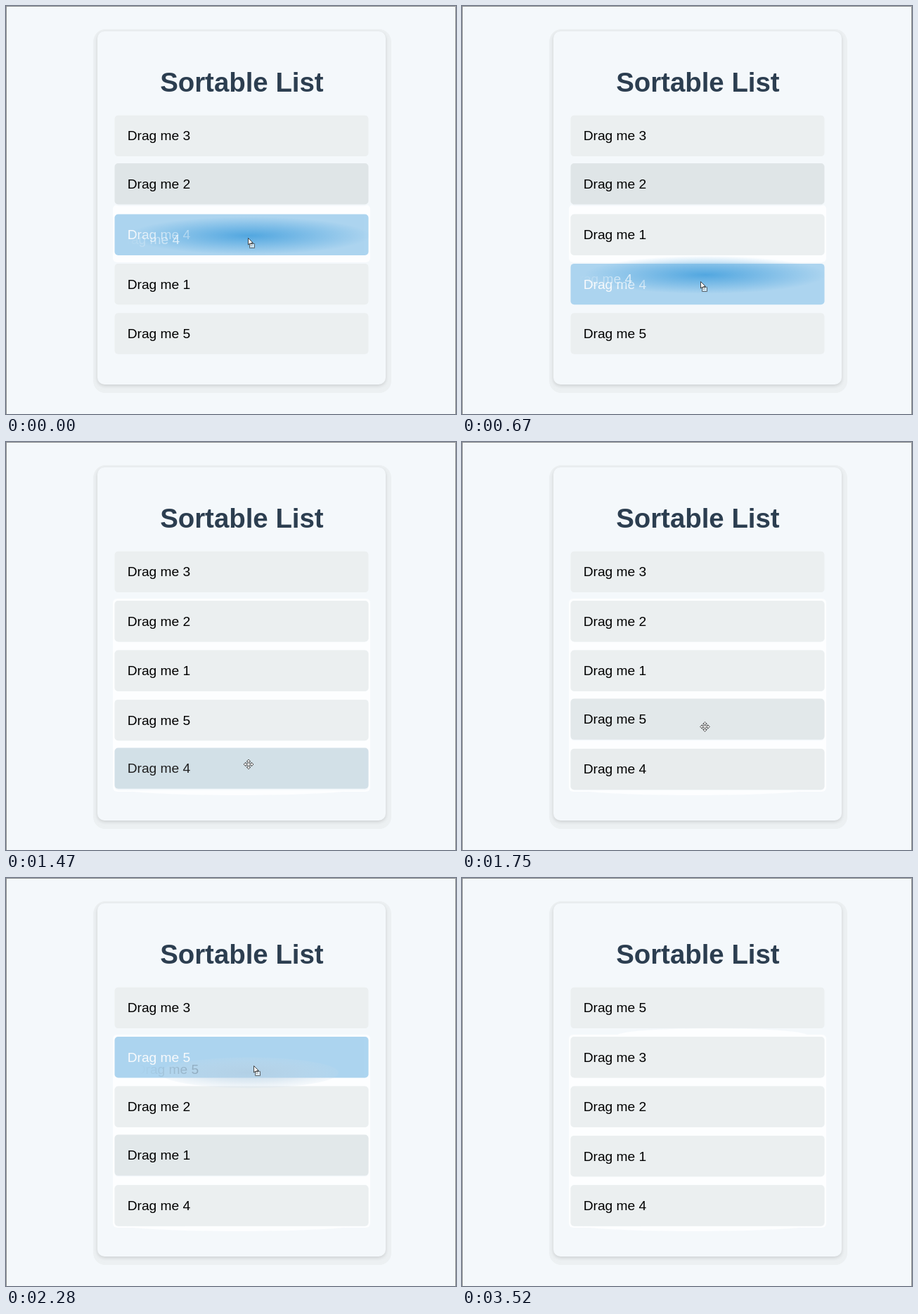
Animation, 640 px wide and 581 px high, one loop 4.13 s. Source, as an HTML page:

```html
<!DOCTYPE html>
<html lang="en">
<head>
<meta charset="utf-8">
<title>Sortable List</title>
<style>
  html, body { margin: 0; width: 100%; height: 100%; overflow: hidden; background: #f4f8fb; }
  .card { position: absolute; left: 130px; top: 36px; width: 410px; height: 503px; border-radius: 10px;
    background: #f4f8fb; box-shadow: 0 2px 5px #0002, 1px 3px 0 6px #ecf0f2, 1px 5px 0 7px #ecf0f2; }
  svg { position: absolute; left: 0; top: 0; width: 640px; height: 581px;
    font: 19.2px "Liberation Sans", Arial, sans-serif; }
</style>
</head>
<body>
<div class="card"></div>
<svg viewBox="0 0 640 581">
  <defs>
    <radialGradient id="blue">
      <stop stop-color="#3498db" stop-opacity=".75"/>
      <stop offset=".5" stop-color="#3498db" stop-opacity=".38"/>
      <stop offset="1" stop-color="#3498db" stop-opacity="0"/>
    </radialGradient>
    <radialGradient id="grey">
      <stop stop-color="#b4cee2" stop-opacity=".75"/>
      <stop offset=".6" stop-color="#bed5e6" stop-opacity=".45"/>
      <stop offset="1" stop-color="#c8dbe9" stop-opacity=".15"/>
    </radialGradient>
    <linearGradient id="whiteText">
      <stop offset=".15" stop-color="#fff" stop-opacity="0"/>
      <stop offset="1" stop-color="#fff" stop-opacity=".75"/>
    </linearGradient>
    <linearGradient id="greyText">
      <stop offset=".05" stop-color="#7890a2" stop-opacity="0"/>
      <stop offset="1" stop-color="#7890a2" stop-opacity=".6"/>
    </linearGradient>
  </defs>
  <path d="M0 .5H639.5V581M.5 0V581" fill="none" stroke="#8c8f91"/>
  <text x="335.4" y="122" text-anchor="middle" font-size="38.4" font-weight="700" fill="#2c3e50">Sortable List</text>
  <g fill="#fdfeff">
    <rect id="halo" x="152" width="366" rx="6"/>
    <ellipse id="topHalo" cx="356" cy="224" rx="135" ry="10"/>
    <ellipse id="endHalo" cx="330" cy="494" rx="165" ry="9"/>
  </g>
  <g id="slots" fill="#f4f8fb"></g>
  <g id="rows"></g>
  <g id="ghost">
    <ellipse id="glow" cx="346"/>
    <text id="label"></text>
  </g>
  <g id="arrow" fill="#fff" stroke="#333">
    <path d="M.5 .5V10L2.8 8L4.4 11.6L6 10.9L4.5 7.4H7.4Z" stroke-width=".9"/>
    <rect x="2.5" y="8.5" width="7" height="6" fill="#fff8" stroke-dasharray="1.5 .6"/>
  </g>
  <path id="move" fill="#fff" stroke="#444" stroke-width=".9"
    d="M0-7L2.8-4H1V-1H4V-2.8L7 0L4 2.8V1H1V4H2.8L0 7L-2.8 4H-1V1H-4V2.8L-7 0L-4-2.8V-1H-1V-4H-2.8Z"/>
</svg>
<script>
// The picture advances in equal steps and rests on the last one.
const LOOP = 4130, STEP = 135.4, LEAD = 40, REST = 26;
const DROP1 = 9.4, LEAVE = 12, GRAB2 = 13.75, DROP2 = 23;
const LAG = .5, PITCH = 70.4, TOP = 155.7;
const PATH = [[0, 344, 330], [5, 339, 392], [7, 341, 452], [11, 345, 459],
  [15, 346, 352], [17, 352, 267], [20, 355, 208], [22, 356, 197]];

const $ = id => document.getElementById(id);
const set = (el, attrs) => { for (const k in attrs) el.setAttribute(k, attrs[k]); };
const show = (id, on) => set($(id), { visibility: on ? "visible" : "hidden" });
const clamp = (v, lo, hi) => Math.max(lo, Math.min(hi, v));
const mix = (a, b, p) => a.map((v, i) => v + (b[i] - v) * p);
const rgb = c => `rgb(${c.map(Math.round)})`;
const ramp = (s, start) => 1 - (1 - clamp((s - start) / 2.15, 0, 1)) ** 2;

const hovers = {
  1: s => ramp(s, 16) - ramp(s, DROP2),
  2: s => 1 - ramp(s, 8),
  4: s => ramp(s, DROP1) - ramp(s, LEAVE),
  5: s => ramp(s, LEAVE) - ramp(s, GRAB2) + ramp(s, DROP2) - ramp(s, 24)
};
const drags = {
  4: s => 1 - ramp(s, DROP1),
  5: s => ramp(s, GRAB2) - ramp(s, DROP2)
};

function mouse(s) {
  const i = PATH.findIndex(p => p[0] > s);
  if (i < 0) return PATH[PATH.length - 1].slice(1);
  const a = PATH[Math.max(0, i - 1)], b = PATH[i];
  return mix(a, b, Math.max(0, (s - a[0]) / (b[0] - a[0]))).slice(1);
}

const box = y => `<rect x="154.5" y="${y}" width="361" height="58.4" rx="5"/>`;
for (let i = 0; i < 5; i++) {
  $("slots").innerHTML += box(TOP + PITCH * i);
  $("rows").innerHTML += `<g>${box(0)}<text x="172.7" y="35.7">Drag me ${i + 1}</text></g>`;
}
const rows = [...$("rows").children];

function draw(s) {
  const first = s < GRAB2, held = first ? 4 : 5;
  const dragging = s < DROP1 || s >= GRAB2 && s < DROP2;
  const [x, y] = mouse(s), late = mouse(s - LAG)[1];

  // The held item takes the slot under the lagging mouse.
  const order = first ? [3, 2, 1, 5] : [3, 2, 1, 4];
  const target = s < DROP1 || !first ? late : mouse(DROP1)[1];
  order.splice(clamp(Math.floor((target - TOP + 6) / PITCH), 0, 4), 0, held);

  rows.forEach((row, i) => {
    const n = i + 1, hover = hovers[n]?.(s) ?? 0, drag = drags[n]?.(s) ?? 0;
    const tint = Math.min(1, drag * 1.3);
    const grey = mix([235, 239, 240], [223, 229, 231], hover);
    const rowY = TOP + PITCH * order.indexOf(n) - 2 * hover;
    set(row, { transform: `translate(0 ${rowY})`, opacity: 1 - .63 * drag });
    set(row.firstChild, { fill: rgb(mix(grey, [52, 152, 219], tint)) });
    set(row.lastChild, { fill: rgb(mix([0, 0, 0], [255, 255, 255], tint)) });
  });

  const [top, end] = s < 8 ? [283, 365] : [223, 498];
  set($("halo"), { y: top, height: end - top });
  show("topHalo", s >= 20);
  show("endHalo", s >= 8);

  const ghostY = late + (first ? 2 : -16);
  show("ghost", dragging);
  set($("glow"), first
    ? { cy: ghostY - 5, rx: 172, ry: 27, fill: "url(#blue)" }
    : { cy: ghostY + 5, rx: 127, ry: 22, fill: "url(#grey)" });
  $("label").textContent = "Drag me " + held;
  set($("label"), {
    x: 172.7 + x - (first ? 359 : 340), y: ghostY + 6.7,
    fill: first ? "url(#whiteText)" : "url(#greyText)"
  });

  show("arrow", dragging);
  show("move", !dragging && s < REST);
  for (const id of ["arrow", "move"]) set($(id), { transform: `translate(${x} ${y})` });
}

function tick(now) {
  draw(Math.min(REST, Math.floor((now % LOOP + LEAD) / STEP)));
  requestAnimationFrame(tick);
}
draw(0);
requestAnimationFrame(tick);
</script>
</body>
</html>
```
